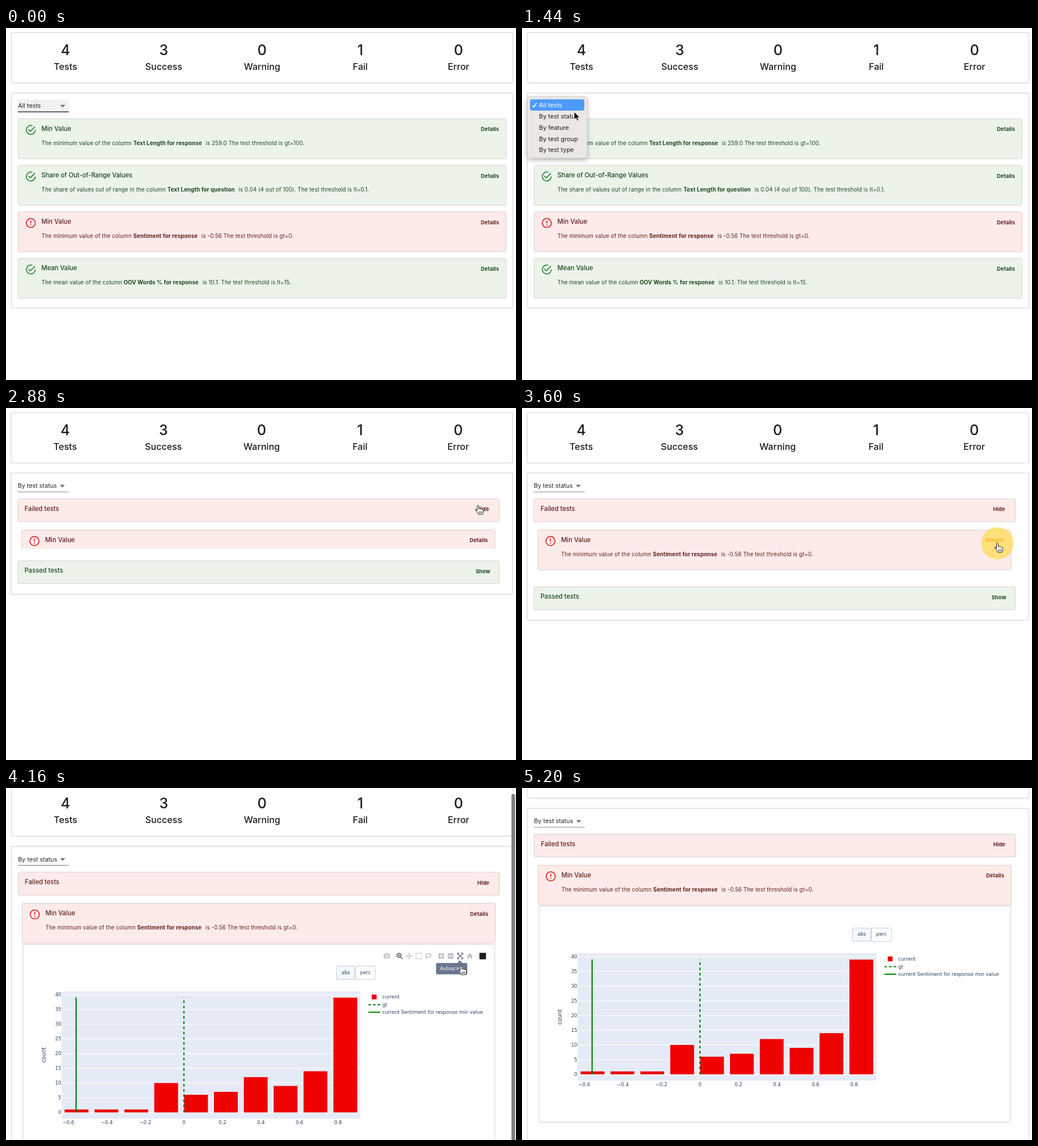
An HTML page that plays this animation: 900x622 px, repeating every 5.36 s.

```html
<!DOCTYPE html>
<html lang="en">
<head>
<meta charset="utf-8">
<title>Test suite report</title>
<style>
  html, body { margin: 0; width: 100%; height: 100%; overflow: hidden; background: #fff; }
  svg { display: block; width: 900px; height: 622px; }
  text { font-family: Inter, sans-serif; white-space: pre; }
  .num { font-size: 25px; font-weight: 500; fill: #1c1c1c; }
  .lab { font-size: 16.1px; font-weight: 500; fill: #1c1c1c; }
  .sel { font-size: 10.8px; fill: #222; }
  .ttl { font-size: 11.2px; font-weight: 500; }
  .txt { font-size: 9.75px; letter-spacing: .1px; }
  .bold { font-weight: 700; }
  .btn { font-size: 9.3px; font-weight: 700; letter-spacing: .1px; }
  .menu { font-size: 10.9px; fill: #1d1d1d; }
  .plot text { font-family: "DejaVu Sans", sans-serif; font-size: 8.5px; fill: #2a3f5f; }
  .plot .axis { font-size: 9.7px; }
  .plot .tip { fill: #fff; }
</style>
</head>
<body>
<svg id="stage" viewBox="0 0 900 622" xmlns="http://www.w3.org/2000/svg"></svg>
<script>
const LOOP = 5360, STEP = 80;
const SCROLL = 79, ITEM_H = 92, CHART_H = 388;

const tones = {
  pass: { fill: '#ecf4ea', line: '#cfd6cd', ink: '#1e4620', icon: '#2f8a3b' },
  fail: { fill: '#fdebea', line: '#dccdcd', ink: '#5f2120', icon: '#d6322f' }
};

const text = (x, y, s, cls, extra = '') => `<text x="${x}" y="${y}" class="${cls}" ${extra}>${s}</text>`;
const rect = (x, y, w, h, fill, extra = '') =>
  `<rect x="${x}" y="${y}" width="${w}" height="${h}" fill="${fill}" ${extra}/>`;
const line = (d, color, w, extra = '') =>
  `<path d="${d}" fill="none" stroke="${color}" stroke-width="${w}" ${extra}/>`;
const group = (id, body, extra = '') => `<g id="${id}" ${extra}>${body}</g>`;
const END = 'text-anchor="end"', MID = 'text-anchor="middle"';

function icon(kind, cx, cy) {
  const d = kind === 'pass'
    ? 'M21 12A9 9 0 1 1 15 3.5M7.2 10.8L11 14.6L20.3 5.3'
    : 'M12 3a9 9 0 1 0 .01 0M12 7v6M12 15v2';
  return line(d, tones[kind].icon, 2, `transform="translate(${cx - 10.6} ${cy - 10.6}) scale(.88)"`);
}

// A result card; parts are [x offset, text, bold?]
function card(kind, x, y, w, title, parts, id = '') {
  const c = tones[kind], ink = `fill="${c.ink}"`;
  return rect(x, y, w, 70.5, c.fill, `stroke="${c.line}" rx="2.5"`) +
    icon(kind, x + 22.3, y + 19.7) +
    text(x + 41, y + 21, title, 'ttl', ink) +
    text(x + w - 12.5, y + 21.8, 'Details', 'btn', `${ink} ${END} id="${id}"`) +
    parts.map(([dx, s, b]) => text(x + dx, y + 46, s, b ? 'txt bold' : 'txt', ink)).join('');
}

function bar(kind, y, title, id) {
  const c = tones[kind], ink = `fill="${c.ink}"`;
  return rect(21.5, y, 849.5, 40.5, c.fill, `stroke="${c.line}" rx="2.5"`) +
    text(33.3, y + 21, title, 'ttl', ink) +
    text(855, y + 21.8, 'Show', 'btn', `${ink} ${END} id="${id}"`);
}

const panel = (y, h, id) =>
  rect(9.5, y, 885, h, '#fff', `stroke="#dedede" stroke-width="1.5" rx="2" id="${id}"`);

const failText = [
  [41, 'The minimum value of the column'],
  [203, 'Sentiment for response', true],
  [323.5, 'is -0.56 The test threshold is gt=0.']
];

function summary() {
  const cells = [['4', 'Tests'], ['3', 'Success'], ['0', 'Warning'], ['1', 'Fail'], ['0', 'Error']];
  return panel(8, 89, 'top') + cells.map(([n, s], i) => {
    const x = 105 + i * 173.4;
    return text(x, 47.7, n, 'num', MID) + text(x, 74, s, 'lab', MID);
  }).join('');
}

function allTests() {
  const x = 21.5, w = 861;
  return card('pass', x, 160.5, w, 'Min Value', [
      [41, 'The minimum value of the column'],
      [203, 'Text Length for response', true],
      [331, 'is 259.0 The test threshold is gt=100.']]) +
    card('pass', x, 242.7, w, 'Share of Out-of-Range Values', [
      [41, 'The share of values out of range in the column'],
      [263.5, 'Text Length for question', true],
      [389, 'is 0.04 (4 out of 100). The test threshold is lt=0.1.']]) +
    card('fail', x, 324.9, w, 'Min Value', failText) +
    card('pass', x, 407.1, w, 'Mean Value', [
      [41, 'The mean value of the column'],
      [186, 'OOV Words % for response', true],
      [325.5, 'is 10.1. The test threshold is lt=15.']]);
}

function modebar() {
  const pale = '#bfc2c8', dark = '#666b75', y = 229.5;
  const plate = (x, d) => rect(x - 5, y - 5, 10, 10, pale, 'rx="1"') + line(d, '#fff', 1.6);
  return rect(666.5, y - 3.5, 11, 8, pale, 'rx="1.5"') + rect(669.5, y - 5, 5, 3, pale) +
    `<circle cx="672" cy="${y + .5}" r="2" fill="${pale}" stroke="#fff" stroke-width="1.2"/>` +
    `<circle cx="693.5" cy="${y - 1}" r="3.6" fill="none" stroke="${dark}" stroke-width="1.8"/>` +
    line('M696 231l4 4M691.7 228.5h3.6M693.5 226.7v3.6', dark, 1.5) +
    line('M706.5 229.5h10M711.5 224.5v10M708 228l-1.5 1.5 1.5 1.5M715 228l1.5 1.5-1.5 1.5' +
      'M710 226l1.5-1.5 1.5 1.5M710 233l1.5 1.5 1.5-1.5', pale, 1.2) +
    rect(723.5, y - 5, 10, 10, 'none', `stroke="${pale}" stroke-width="1.4" stroke-dasharray="2 1.3"`) +
    line('M742 232c-3-3 0-7 4-7s6 4 2 6-6 0-6 1 1 2-1 3', pale, 1.4) +
    plate(768, 'M765 229.5h6M768 226.5v6') + plate(784.5, 'M781.5 229.5h6') +
    line('M797 228v-3.500h3M803 224.500h3v3.500M806 231v3.500h-3M800 234.500h-3v-3.500' +
      'M798.500 226.500l6 6M804.500 226.500l-6 6', dark, 1.4) +
    `<path d="M813 230l5.500-5.500 5.500 5.500h-1.500v4.500h-2.500v-3h-3v3h-2.500v-4.500z" fill="${pale}"/>` +
    rect(835.5, y - 5.5, 11.5, 11.5, '#1d1d20', 'rx="1"');
}

function chart() {
  const X = v => 314 + v * 340, Y = v => 506 - v * 5.2;
  const green = '#008000', red = '#ee0300';
  let s = rect(30, 209, 832.5, 381.5, '#fff', 'stroke="#cfcfcf" rx="2"') +
    rect(98, 292, 527.5, 225, '#e5ebf6');
  for (let v = 0; v <= 40; v += 5) {
    s += line(`M98 ${Y(v)}H625.5`, '#fff', v ? 1 : 1.8) + text(97.5, Y(v) + 3.1, v, '', END);
  }
  [1, 1, 1, 10, 6, 7, 12, 9, 14, 39].forEach((v, i) => {
    s += rect(103.5 + i * 52.7, Y(v), 42, v * 5.2, red);
  });
  for (let k = -3; k <= 4; k++) {
    const v = k / 5;
    s += text(X(v), 526.5, String(v).replace('-', '−'), '', MID);
  }
  s += line('M123.700 506V303', green, 2.2) +
    line('M314 506V303', green, 2.2, 'stroke-dasharray="4.6 4.6"') +
    text(0, 0, 'count', 'axis', `${MID} transform="translate(70 404.5) rotate(-90)"`);
  s += rect(645.5, 297.7, 8.5, 8.5, red) +
    line('M639.500 315.700H660.500', green, 2, 'stroke-dasharray="4.6 3.500"') +
    line('M639.500 329H660.500', green, 2);
  ['current', 'gt', 'current Sentiment for response min value'].forEach((t, i) => {
    s += text(664, 305.2 + i * 13.5, t, '');
  });
  const edge = 'stroke="#c3cddc" rx="1.5"';
  s += rect(583.5, 247.5, 32, 23.5, '#f3f8fe', edge) + text(599.5, 261.3, 'abs', '', MID) +
    rect(616.5, 247.5, 35.5, 23.5, '#fff', edge) + text(634.3, 261.3, 'perc', '', MID);
  s += group('tools', modebar() + group('tip',
    `<path d="M801 237l5 5.500h-10z" fill="#6b768d"/>` + rect(759, 242, 55, 20, '#6b768d', 'rx="1.5"') +
    text(786.5, 255.2, 'Autoscale', 'tip', MID)));
  return `<g class="plot" transform="translate(0 ${SCROLL})">${s}</g>`;
}

function menu() {
  const rows = ['All tests', 'By test status', 'By feature', 'By test group', 'By test type'];
  return rect(9.5, 121.5, 105.5, 108.5, '#ebe7e5', 'rx="5" stroke="#cbc8c6" stroke-width=".8" filter="url(#shade)"') +
    rect(14, 126, 96, 20, '#4d9bff', 'rx="4" id="mark"') +
    line('M18.500 136.500l2.500 3 4.500-7', '#fff', 1.5, 'id="tick"') +
    rows.map((s, i) => text(30, 140 + i * 19.85, s, 'menu', `id="row${i}"`)).join('');
}

const pointer = '<path d="M0 0V14L3.200 11.100L5.500 16.200L7.900 15.100L5.600 10.200H10Z" fill="#000" stroke="#fff"/>';
const hand = '<path d="M-1.600 9.500V1.500a1.500 1.500 0 0 1 3 0V6q1.400-1 2.800.3 1.500-.8 2.700.6 1.800-.5 2.500 1.400V11q0 2.500-1.500 5H1' +
  'q-1-2-3-4.200-2.200-2.500-2.800-3.400-.2-1.700 1.400-1.400z" fill="#fff" stroke="#111" stroke-linejoin="round"/>' +
  line('M2 10.500v3.500M4.200 10.500v3.500M6.400 10.500v3.500', '#111', .9);

document.getElementById('stage').innerHTML =
  `<defs>
    <filter id="shade" x="-30%" y="-30%" width="160%" height="160%">
      <feDropShadow dx="0" dy="3" stdDeviation="4" flood-color="#000" flood-opacity=".28"/>
    </filter>
    <clipPath id="itemClip">${rect(0, 203, 900, 0, '#000', 'id="itemBox"')}</clipPath>
    <clipPath id="chartClip">${rect(0, 287, 900, 0, '#000', 'id="chartBox"')}</clipPath>
  </defs>` + rect(0, 0, 900, 622, '#fff') +
  group('page',
    summary() + panel(115, 380, 'body') +
    group('picker',
      rect(21, 126, 90, 22, '#f2f2f2', 'id="pickBg"') + line('M21 148.300H111', '#333', 1.5, 'id="pickLine"') +
      text(21.3, 141.3, 'All tests', 'sel', 'id="pickText"') +
      '<path d="M95.500 135.700h9l-4.500 4.800z" fill="#757575"/>') +
    group('all', allTests()) +
    group('status',
      bar('fail', 160.5, 'Failed tests', 'failBtn') +
      group('item', card('fail', 28.5, 215.5, 835, 'Min Value', failText, 'detail'), 'clip-path="url(#itemClip)"') +
      group('chart', chart(), 'clip-path="url(#chartClip)"') +
      group('passed', bar('pass', 224, 'Passed tests', 'passBtn')))) +
  group('menu', menu()) +
  rect(892, 0, 6.5, 700, '#7f7f7f', 'rx="3.2" id="thumb"') +
  group('cursor', '<circle id="ring" r="28.5" fill="#fdd835" opacity=".6"/>' +
    group('pointer', pointer) + group('hand', hand));

const el = {};
document.querySelectorAll('[id]').forEach(n => { if (n.id) el[n.id] = n; });
const set = (id, attr, v) => el[id].setAttribute(attr, v);
const show = (id, on) => set(id, 'display', on ? 'inline' : 'none');

const clamp = v => Math.min(1, Math.max(0, v));
const ramp = (t, a, b) => clamp((t - a) / (b - a));
const cubic = u => u < .5 ? 4 * u ** 3 : 1 - 4 * (1 - u) ** 3;
const smooth = u => u * u * (3 - 2 * u);
const within = (t, spans) => spans.some(([a, b]) => t >= a && t < b);

// Cursor stops: time, x, y
const path = [
  [160, 440, 436], [720, 92, 130], [1280, 92, 130], [1440, 92, 148], [1600, 92, 154],
  [1700, 92, 154], [2240, 833, 172], [2880, 833, 172], [3280, 839, 239],
  [3680, 839, 239], [4000, 803, 314], [LOOP, 803, 314]
];
const hands = [[2240, 2960], [3200, 3760], [3920, LOOP]];
const clicks = [[960, 1120], [1600, 1760], [2720, 2880], [3520, 3760]];

function cursorAt(t) {
  const i = Math.max(1, path.findIndex(p => p[0] >= t));
  const [a, b] = [path[i - 1], path[i]];
  const u = smooth(ramp(t, a[0], b[0]));
  return [a[1] + (b[1] - a[1]) * u, a[2] + (b[2] - a[2]) * u];
}

function draw(t) {
  const status = t >= 1760, blurred = t >= 2720;
  const e1 = smooth(ramp(t, 2720, 3040)), e2 = smooth(ramp(t, 3705, 4005));
  const scroll = SCROLL * cubic(ramp(t, 4040, 4400));
  const grow = ITEM_H * e1 + CHART_H * e2;

  set('page', 'transform', `translate(${blurred && t < 3840 ? -.6 : 0} ${-scroll})`);
  set('body', 'height', status ? 168 + grow : 380);
  show('all', !status);
  show('status', status);
  el.pickText.textContent = status ? 'By test status' : 'All tests';
  show('pickBg', !blurred);
  set('pickLine', 'stroke', blurred ? '#8d8d8d' : '#333');
  set('pickLine', 'stroke-width', blurred ? 1.1 : 1.5);

  el.failBtn.textContent = blurred ? 'Hide' : 'Show';
  set('failBtn', 'x', blurred ? 853 : 855);
  set('itemBox', 'height', ITEM_H * e1);
  set('chartBox', 'height', CHART_H * e2);
  show('item', e1 > 0);
  show('chart', e2 > 0);
  set('passed', 'transform', `translate(0 ${grow})`);
  set('detail', 'fill', within(t, [clicks[3]]) ? '#fb8a1c' : tones.fail.ink);

  const leave = 1 - ramp(t, 4640, 4880);
  show('tools', t >= 3920);
  set('tools', 'opacity', leave);
  show('tip', t >= 4000 && t < 4560);

  const row = t >= 1520 ? 1 : 0;
  show('menu', t >= 1040 && t < 1760);
  set('mark', 'y', 126 + row * 19.85);
  set('tick', 'stroke', row ? '#1d1d1d' : '#fff');
  for (const i of [0, 1]) el['row' + i].style.fill = i === row ? '#fff' : '#1d1d1d';

  show('thumb', t >= 4040 && t < 5200);
  set('thumb', 'y', scroll * .89);
  set('thumb', 'opacity', t >= 5120 ? .5 : 1);

  const [x, y] = cursorAt(t), isHand = within(t, hands);
  show('cursor', t >= 160 && leave > 0);
  set('cursor', 'transform', `translate(${x} ${y})`);
  set('cursor', 'opacity', leave);
  show('hand', isHand);
  show('pointer', !isHand);
  show('ring', within(t, clicks));
}

const start = performance.now();
function tick() {
  const t = (performance.now() - start) % LOOP;
  draw(Math.floor(t / STEP) * STEP);
  requestAnimationFrame(tick);
}
draw(0);
requestAnimationFrame(tick);
</script>
</body>
</html>
```
